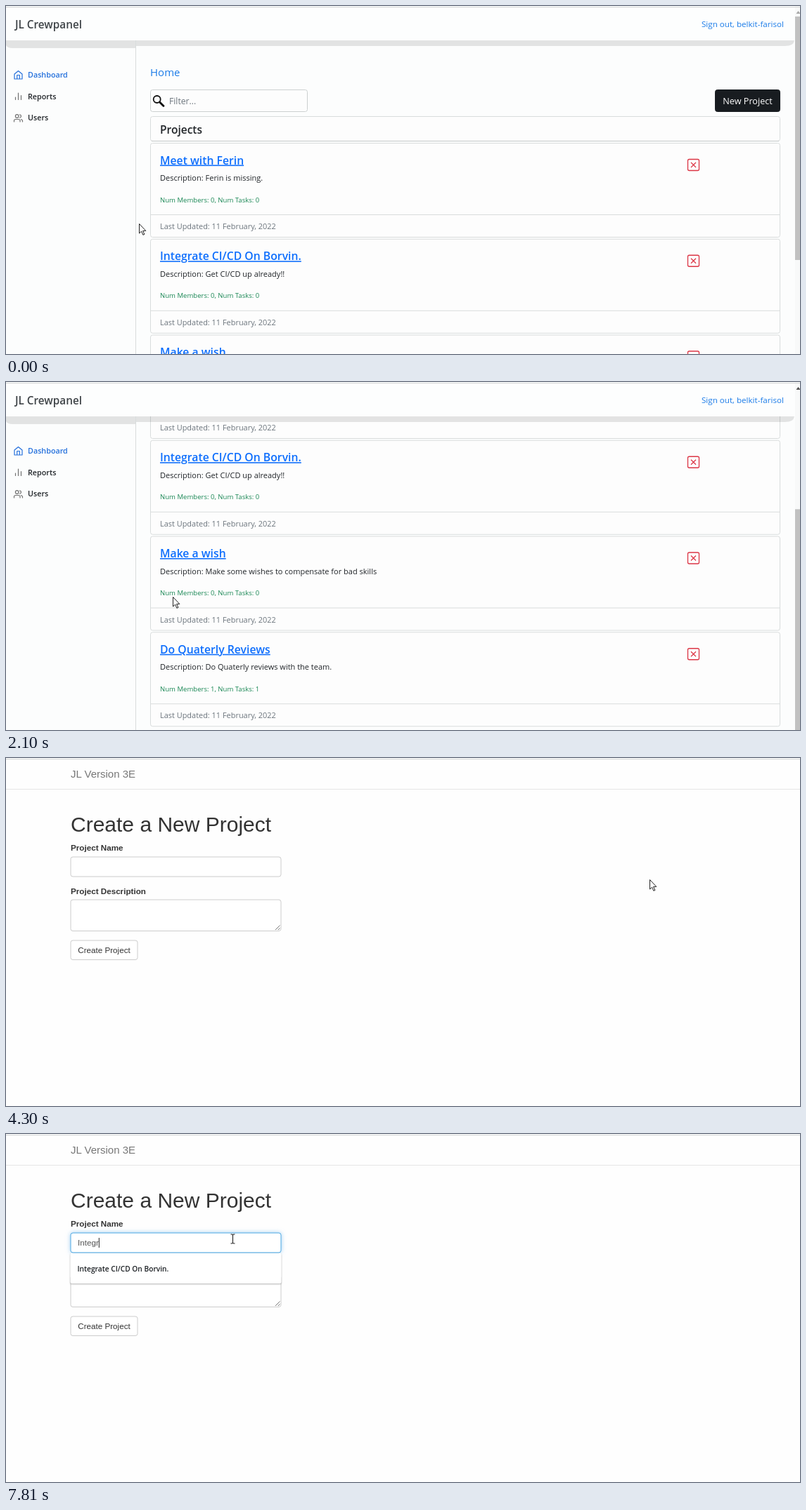
An HTML page for the animation above (8000 ms loop, 1129 by 496 pixels).

```html
<!DOCTYPE html>
<html lang="en">
<head>
<meta charset="utf-8">
<title>Project dashboard</title>
<style>
  html, body { margin: 0; width: 100%; height: 100%; overflow: hidden; background: #fcfdfd; }
  svg { display: block; width: 1129px; height: 496px; }
  text { font-family: "Open Sans", "Noto Sans", sans-serif; fill: #212529; white-space: pre; }
  .semi { font-weight: 600; }
  .form text { font-family: "Liberation Sans", Arial, sans-serif; fill: #333; }
  .form .menu text { font: 600 10.2px "Open Sans", "Noto Sans", sans-serif; fill: #1c2024; }
  .link { fill: #0d6efd; text-decoration: underline; }
  .menu rect { filter: drop-shadow(0 1px 1px rgba(0, 0, 0, .3)); }
  .focus { filter: drop-shadow(0 0 3px rgba(102, 175, 233, .6)); }
</style>
</head>
<body>
<svg id="stage" viewBox="0 0 1129 496"></svg>
<script>
const LOOP = 8000;
const PITCH = 136.75;

const text = (x, y, size, str, attrs = '') =>
  `<text x="${x}" y="${y}" font-size="${size}" ${attrs}>${str}</text>`;
const box = (x, y, w, h, stroke, fill = '#fdfdfd', attrs = '') =>
  `<rect x="${x}" y="${y}" width="${w}" height="${h}" rx="3" fill="${fill}" stroke="${stroke}" ${attrs}/>`;
const path = (d, attrs) => `<path d="${d}" ${attrs}/>`;
const fill = c => `style="fill:${c}"`;

const projects = [
  ['Meet with Ferin', 'Ferin is missing.', 0],
  ['Integrate CI/CD On Borvin.', 'Get CI/CD up already!!', 0],
  ['Make a wish', 'Make some wishes to compensate for bad skills', 0],
  ['Do Quaterly Reviews', 'Do Quaterly reviews with the team.', 1]
];

const card = ([title, about, n], i) => `<g transform="translate(0 ${i * PITCH})">
  ${box(205.5, 195.5, 895, 134, '#d9dcdc')}
  ${path('M206 297.5H1100', 'stroke="#d9dcdc"')}
  ${text(219, 225.5, 15.75, title, 'class="semi link"')}
  ${text(219, 249, 11, 'Description: ' + about)}
  ${text(219, 279.7, 9.57, `Num Members: ${n}, Num Tasks: ${n}`, fill('#198754'))}
  ${text(219, 318, 10.95, 'Last Updated: 11 February, 2022', fill('#6c757d'))}
  <rect x="969.5" y="218.5" width="16" height="16" rx="2" fill="none" stroke="#dc3545" stroke-width="1.3"/>
  ${path('M974 223l7 7M981 223l-7 7', 'stroke="#dc3545" stroke-width="1.2"')}
</g>`;

const sidebar = `
  ${path('M184.5 49V496', 'stroke="#d8dcdc"')}
  <g fill="none" stroke-width="1.2" stroke-linejoin="round" stroke-linecap="round">
    ${path('M12 97l5.5-4.5L23 97v7H12zM15.7 104v-5.5h3.6v5.5', 'stroke="#2470dc"')}
    <g stroke="#727272">
      ${path('M13.5 130v3.5M17.5 124v9.5M21.5 127.500v6', '')}
      <circle cx="15.700" cy="157" r="2.3"/>
      ${path('M11.500 165v-1.500q0-2 2-2h4.500q2 0 2 2v1.500M19.500 154.800q2 .6 2 2.200t-2 2.200M21.500 161.700q2 .4 2 2v1.300', '')}
    </g>
  </g>
  ${text(31, 101.500, 10.75, 'Dashboard', 'class="semi" ' + fill('#2470dc'))}
  ${text(31, 132.5, 10.75, 'Reports', 'class="semi"')}
  ${text(31, 163, 10.75, 'Users', 'class="semi"')}`;

const content = `
  ${text(205, 100, 15, 'Home', fill('#1a7be8'))}
  ${box(205.5, 119.5, 223, 31, '#ccd0d0')}
  <circle cx="214.700" cy="133" r="5" fill="none" stroke="#111" stroke-width="1.800"/>
  ${path('M218.500 137l5.500 5.500', 'stroke="#111" stroke-width="2.800" stroke-linecap="round"')}
  ${text(232, 140, 12.2, 'Filter...', fill('#6c757d'))}
  <rect id="ring" x="1006.500" y="117.500" width="96" height="35" rx="4" fill="none" stroke="#a0a2a4" stroke-width="3"/>
  ${box(1008.5, 119.5, 92, 31, '#181c20', '#181c20')}
  ${text(1054.5, 140, 12.65, 'New Project', 'text-anchor="middle" ' + fill('#fff'))}
  ${box(205.5, 157.5, 895, 35, '#d9dcdc')}
  ${path('M207 192.500H1099', 'stroke="#c4c8c8"')}
  ${text(219, 181.5, 15.5, 'Projects', 'class="semi"')}
  ${projects.map(card).join('')}`;

const dashboard = `<g id="dashboard">
  ${sidebar}
  <g clip-path="url(#view)"><g id="scroll">${content}</g></g>
  ${path('M0 49H184V60H9Q2 60 0 56zM185 49H1121Q1120 57 1108 57H185z', 'fill="#000" opacity=".1"')}
  <rect width="1122" height="49" fill="#fdfefe"/>
  ${text(13, 31.500, 15.3, 'JL Crewpanel', 'class="semi" ' + fill('#3f4448'))}
  ${text(1106, 30, 11.63, 'Sign out, belkit-farisol', 'text-anchor="end" ' + fill('#1a7be8'))}
  <rect x="1122" width="7" height="496" fill="#f8f9f9"/>
  <path id="up" d="M1123.500 11l3-4 3 4z"/>
  <rect id="thumb" x="1122" width="7" height="347" fill="#c1c1c1"/>
</g>`;

const form = `<g id="form" class="form">
  <rect width="1129" height="496" fill="#fefefe"/>
  ${text(92, 28, 15, 'JL Version 3E', fill('#777'))}
  ${path('M0 44.500H1129', 'stroke="#e6e6e6"')}
  ${text(92, 105, 30, 'Create a New Project')}
  ${text(92, 132, 11.67, 'Project Name', 'font-weight="700"')}
  ${box(92, 141, 299, 28, '#ccc', '#fff', 'id="field"')}
  ${text(92, 194, 11.67, 'Project Description', 'font-weight="700"')}
  ${box(92, 202, 299, 44.5, '#ccc', '#fff')}
  ${path('M383 245l6.500-6.500M387 245l2.500-2.500', 'stroke="#777"')}
  ${box(92, 260, 95, 27.5, '#ccc', '#fff')}
  ${text(139.5, 278, 11.67, 'Create Project', 'text-anchor="middle"')}
  <text id="typed" x="102" y="159" font-size="11.67" style="fill:#555"></text>
  <rect id="caret" y="148" width="1" height="14" fill="#222"/>
  <g id="menu" class="menu"><rect id="sheet" x="91.500" y="170" width="300" rx="2" fill="#fff"/><g id="items"></g></g>
</g>`;

const cursors = `
  <g id="arrow">${path('M.5.5V14l3.100-2.900 2.300 5.200 2-.9-2.300-5h4.200z', 'fill="#fff" stroke="#222"')}</g>
  <g id="beam">${path('M-3-6.500h2l1 .7 1-.7h2M-3 6.500h2l1-.7 1 .7h2M0-6V6', 'fill="none" stroke="#222" stroke-width="1.100"')}</g>
  <g id="hand">${path('M-1.500 10V1.500q0-1.500 1.500-1.500t1.500 1.500V6l5.500 1.200q1.500.4 1.500 2v3.300l-1.500 3v2H0l-1-2.500-3.500-4.500q-1-1.500.3-2.200 1-.4 2.700 1.700z', 'fill="#fff" stroke="#222" stroke-width=".8"')}</g>`;

const stage = document.getElementById('stage');
stage.innerHTML = `<defs><clipPath id="view"><rect y="49" width="1122" height="447"/></clipPath></defs>
  <rect width="1129" height="496" fill="#fcfdfd"/>
  ${dashboard}${form}
  <rect y="1" width="1129" height="1.200" fill="#d9dbdb"/>
  ${cursors}`;

const $ = id => document.getElementById(id);
const show = (id, on) => $(id).setAttribute('display', on ? 'inline' : 'none');

// Each step holds from its time until the next one.
const scrollSteps = [[0, 0], [700, 50], [820, 80], [970, 83], [1120, 112], [1250, 152], [1380, 166],
  [1980, 212], [2100, 249], [2760, 207], [2880, 75], [3010, 0]];
const cursorSteps = [[0, 'arrow', 189, 310], [130, 'arrow', 204, 309], [290, 'arrow', 212, 306],
  [420, 'arrow', 217, 304], [550, 'arrow', 219, 302], [700, 'beam', 227, 309], [1250, 'arrow', 228, 308],
  [1540, 'arrow', 230, 308], [1690, 'arrow', 235, 307], [1840, 'arrow', 237, 306], [2390, 'arrow', 240, 308],
  [2510, 'arrow', 242, 310], [3150, 'arrow', 593, 226], [3300, 'arrow', 842, 167], [3420, 'arrow', 957, 157],
  [3540, 'arrow', 990, 141], [3660, 'hand', 1022, 131], [3780, 'hand', 1027, 132], [3910, 'hand', 1029, 132],
  [4170, 'arrow', 1022, 140], [4300, 'arrow', 915, 173], [4460, 'arrow', 658, 154], [4600, 'arrow', 510, 183],
  [4720, 'arrow', 380, 162], [4850, 'beam', 322.5, 149.5]];
const typeSteps = [[0, ''], [7270, 'I'], [7420, 'In'], [7550, 'Inte'], [7680, 'Integ'], [7810, 'Integr']];
const caretSteps = [[0, 0], [5000, 1], [5590, 0], [6120, 1], [6540, 0], [7110, 1]];

const at = (steps, t) => steps.findLast(s => s[0] <= t);

const history = ['1', projects[3][0], '2', '3', '4', 'testing'];
let listed = null;
function fillMenu(names) {
  const key = names.join();
  if (key === listed) return;
  listed = key;
  $('items').innerHTML = names.map((s, i) => text(101.5, 195.5 + 30 * i, 10.2, s)).join('');
  $('sheet').setAttribute('height', 13 + 30 * names.length);
}

function draw(t) {
  const onForm = t >= 4170, focused = t >= 5000;
  show('dashboard', !onForm);
  show('form', onForm);

  const y = at(scrollSteps, t)[1];
  $('scroll').setAttribute('transform', `translate(0 ${-y})`);
  $('thumb').setAttribute('y', 15 + y * .668);
  $('up').setAttribute('fill', y ? '#505050' : '#a8a8a8');
  show('ring', t >= 4030);

  const typed = at(typeSteps, t)[1];
  $('typed').textContent = typed;
  $('field').setAttribute('stroke', focused ? '#4fa9e3' : '#ccc');
  $('field').setAttribute('class', focused ? 'focus' : '');
  show('caret', at(caretSteps, t)[1]);
  $('caret').setAttribute('x', 102 + (typed && onForm ? $('typed').getComputedTextLength() : 0));
  show('menu', t >= 5120);
  fillMenu(typed ? [projects[1][0]] : history);

  const [, kind, cx, cy] = at(cursorSteps, t);
  for (const id of ['arrow', 'beam', 'hand']) show(id, id === kind);
  $(kind).setAttribute('transform', `translate(${cx} ${cy})`);
}

const start = performance.now();
function tick() {
  draw((performance.now() - start) % LOOP);
  requestAnimationFrame(tick);
}
tick();
</script>
</body>
</html>
```
